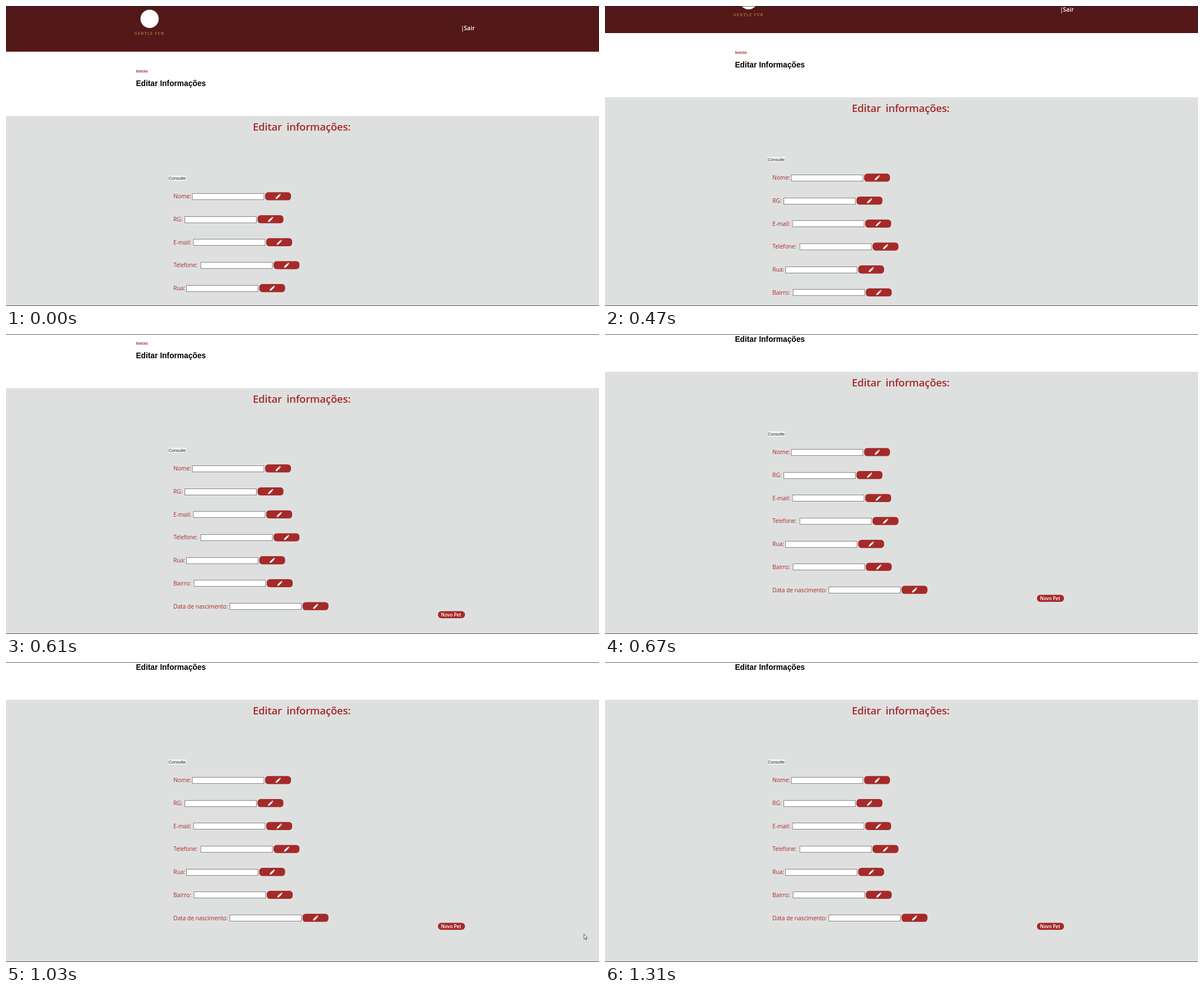
An HTML page that plays this animation: 1053 px wide and 532 px high, repeating every 1.58 s.

```html
<!DOCTYPE html>
<html lang="pt">
<head>
<meta charset="utf-8">
<title>Editar Informações</title>
<style>
  html, body { margin: 0; width: 100%; height: 100%; overflow: hidden; background: #dee0df; }
  svg { display: block; width: 1053px; height: 532px; }
  .round { font-family: "Open Sans", sans-serif; fill: #a52a2a; }
  .label { font-size: 10.1px; }
  .title { font-size: 18.5px; font-weight: 600; letter-spacing: -.25px; word-spacing: 4px; }
  .white { fill: #fff; font-weight: 600; }
  .plain { font-family: "Liberation Sans", Arial, sans-serif; }
  .brand { font: 7px "Noto Serif", serif; letter-spacing: 1px; fill: #c9964a; }
  .edge { fill: #1e202d; fill-opacity: .72; }
</style>
</head>
<body>
<svg viewBox="0 0 1053 532">
  <defs>
    <path id="pencil" fill="#fff" d="M-4.5 4.5 -3.9 1.7 1.3 -3.3 3.5 -1.1 -1.7 3.9ZM1.9 -3.8 2.7 -4.5Q3.2 -4.8 3.7 -4.4L4.4 -3.7Q4.8 -3.2 4.5 -2.7L4 -1.7Z"/>
  </defs>
  <g id="page">
    <rect width="1053" height="81" fill="#531818"/>
    <rect y="81" width="1053" height="114" fill="#fff"/>
    <rect y="195" width="1053" height="500" fill="#dee0df"/>
    <circle cx="255" cy="22.7" r="16.2" fill="#fff"/>
    <text class="brand" x="228" y="50.5">GENTLE FUR</text>
    <text class="round white" x="808" y="42.5" font-size="10">|</text>
    <text class="round white" x="813" y="43" font-size="10.6">Sair</text>
    <text class="plain" x="231" y="117.5" font-size="8.05" font-weight="700" fill="#a52a2a">Início</text>
    <text class="plain" x="230.7" y="142.2" font-size="13.72" font-weight="700">Editar Informações</text>
    <text class="round title" x="438.2" y="221">Editar informações:</text>
    <rect x="289" y="300.5" width="30.5" height="9.5" fill="#f0f2f3"/>
    <text class="plain" x="289" y="308" font-size="7.6" fill="#222">Consulte</text>
    <g id="rows"></g>
    <rect x="767" y="590.5" width="48" height="12.5" rx="6" fill="#a52a2a"/>
    <text class="round white" x="772.5" y="600" font-size="8.2">Novo Pet</text>
  </g>
  <rect class="edge" width="1053" height="1"/>
  <rect class="edge" y="531" width="1053" height="1"/>
  <path id="cursor" d="M.3 .3V9.4L2.4 7.6 3.8 10.8 5.1 10.2 3.7 7.1H6.4Z" fill="#fff" stroke="#333" stroke-width=".8"/>
</svg>
<script>
const LOOP = 1580;

// label, left edge of its field
const fields = [
  ["Nome:", 330.5], ["RG:", 317], ["E-mail:", 332.5], ["Telefone:", 345.5],
  ["Rua:", 320], ["Bairro:", 333.5], ["Data de nascimento:", 397]
];

// time, scroll offset
const scrollSteps = [[0, 0], [410, 3], [470, 33], [530, 70], [610, 99], [670, 128]];

// time, pointer x, pointer y
const cursorSteps = [
  [0, -50, 0], [890, 1047, 364], [960, 1034, 430], [1030, 1026, 482],
  [1100, 1024, 502], [1170, 1025, 515], [1240, 1027, 525], [1310, -50, 0]
];

const fieldRow = ([label, x], i) => {
  const y = 332.3 + 40.7 * i;
  return `<text class="round label" x="297.3" y="${y + 9}">${label}</text>
    <rect x="${x + .5}" y="${Math.floor(y) + .5}" width="127" height="11" fill="#fff" stroke="#858585"/>
    <rect x="${x + 129.6}" y="${y - 2}" width="46" height="14.3" rx="5.5" fill="#a52a2a"/>
    <use href="#pencil" x="${x + 152.7}" y="${y + 5.5}"/>`;
};

const byId = id => document.getElementById(id);
const stepAt = (steps, t) => steps.findLast(step => step[0] <= t);

byId("rows").innerHTML = fields.map(fieldRow).join("");

const start = performance.now();

function draw() {
  const t = Math.max(0, performance.now() - start) % LOOP;
  const [, scroll] = stepAt(scrollSteps, t);
  const [, x, y] = stepAt(cursorSteps, t);
  byId("page").setAttribute("transform", `translate(0 ${-scroll})`);
  byId("cursor").setAttribute("transform", `translate(${x} ${y})`);
  requestAnimationFrame(draw);
}
draw();
</script>
</body>
</html>
```
